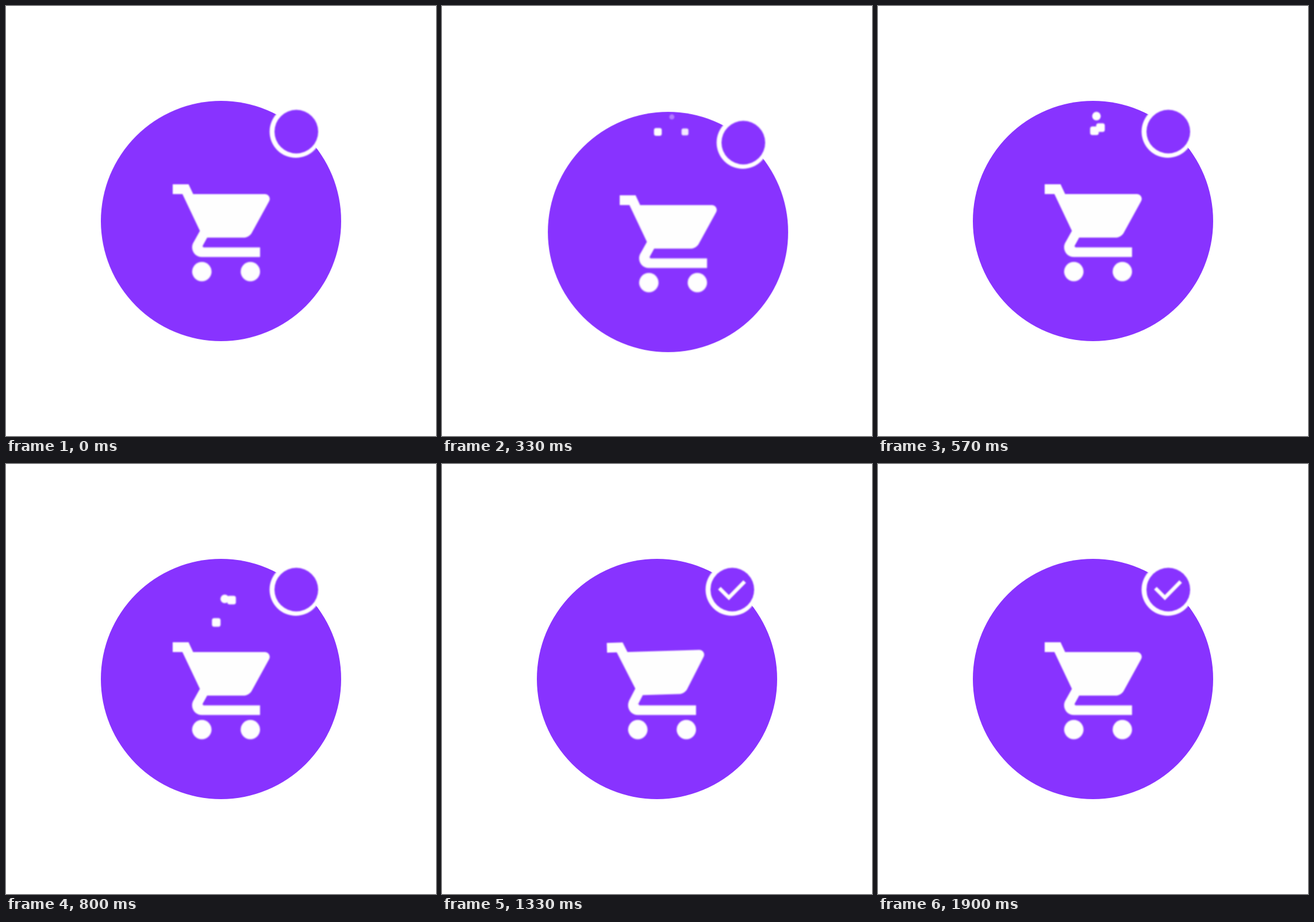
An HTML page without scripts for the animation above (2.03 s loop, 748 by 748 pixels).

```html
<!DOCTYPE html>
<html lang="en">
<head>
<meta charset="utf-8">
<title>Added to cart</title>
<style>
  html, body { margin: 0; width: 100%; height: 100%; overflow: hidden; background: #fff; }
  svg { display: block; width: 100vw; height: 100vh; }
  .disc { fill: #8833ff; }
  .white { fill: #fefefe; }
  .soft { filter: blur(1.3px); }
  .press, .basket, .item, .tick { animation: 2030ms linear infinite; }
  .press { animation-name: press; }
  .basket { animation-name: swing; transform-origin: 324px 421px; }
  .item { opacity: 0; }
  .a { animation-name: item-a; }
  .b { animation-name: item-b; }
  .c { animation-name: item-c; }
  .tick {
    animation-name: draw;
    fill: none; stroke: #fefefe; stroke-width: 6.5;
    stroke-dasharray: 1 2; stroke-dashoffset: 1.02;
  }

  @keyframes press {
    0% { transform: none; animation-timing-function: ease-in-out; }
    6.4% { transform: translate(39px, 39px); animation-timing-function: ease-in-out; }
    26%, 100% { transform: none; }
  }

  /* items gather above the cart, then drop in one by one */
  @keyframes item-a {
    0%, 3% { transform: translate(377px, 270px) scale(0); opacity: 0; }
    6.4% { transform: translate(377px, 251px) scale(.55); opacity: .35; animation-timing-function: ease-out; }
    16.2% { transform: translate(375.5px, 219px) scale(.9); opacity: 1; }
    28.1% { transform: translate(376.5px, 217px); opacity: 1; animation-timing-function: cubic-bezier(.5, 0, .9, .6); }
    43.8% { transform: translate(352px, 350px); opacity: 1; }
    43.9%, 100% { transform: translate(352px, 350px); opacity: 0; }
  }
  @keyframes item-b {
    0%, 4% { transform: translate(485px, 300px) scale(0); opacity: 0; }
    6.4% { transform: translate(471px, 284px) scale(.5); opacity: .12; animation-timing-function: ease-out; }
    16.2% { transform: translate(423px, 219px) scale(.8); opacity: .9; }
    28.1% { transform: translate(387px, 211.5px); opacity: 1; animation-timing-function: cubic-bezier(.5, 0, .9, .6); }
    51.7% { transform: translate(416px, 346px); opacity: 1; }
    51.8%, 100% { transform: translate(416px, 346px); opacity: 0; }
  }
  @keyframes item-c {
    0%, 12% { transform: translate(412px, 200px) scale(0); opacity: 0; }
    16.2% { transform: translate(400px, 193px) scale(.6); opacity: .35; }
    28.1% { transform: translate(380px, 191.5px); opacity: 1; animation-timing-function: cubic-bezier(.5, 0, .9, .6); }
    47.8% { transform: translate(382px, 350px); opacity: 1; }
    47.9%, 100% { transform: translate(382px, 350px); opacity: 0; }
  }

  @keyframes swing {
    0%, 42.8% { transform: none; animation-timing-function: ease-in; }
    46.8% { transform: rotate(2.5deg); animation-timing-function: ease-out; }
    50.7% { transform: rotate(4.9deg); animation-timing-function: ease-in-out; }
    58% { transform: rotate(-5.5deg); animation-timing-function: ease-in-out; }
    65.5% { transform: rotate(-1.8deg); animation-timing-function: ease-out; }
    70.8% { transform: rotate(1.2deg); animation-timing-function: ease-in-out; }
    76.5% { transform: rotate(-.6deg); animation-timing-function: ease-in-out; }
    83.5% { transform: rotate(.3deg); animation-timing-function: ease-in-out; }
    92%, 100% { transform: none; }
  }

  @keyframes draw {
    0%, 48.3% { stroke-dashoffset: 1.02; animation-timing-function: cubic-bezier(.3, .3, .4, 1); }
    63%, 100% { stroke-dashoffset: 0; }
  }
</style>
</head>
<body>
<svg viewBox="0 0 748 748">
  <g class="press">
    <circle class="disc" cx="374" cy="374" r="209"/>
    <g class="soft">
      <g class="white" transform="translate(281.5 293.2) scale(8.44)">
        <circle cx="7" cy="20" r="2"/>
        <circle cx="17" cy="20" r="2"/>
        <path d="M5.25 14.04c-.16.28-.25.61-.25.96 0 1.1.9 2 2 2h12v-2H7.42c-.14 0-.25-.11-.25-.25z"/>
      </g>
      <g class="basket">
        <path class="white" transform="translate(281.5 293.2) scale(8.44)"
          d="M1 2v2h2l3.6 7.59-1.35 2.45L5.2 15l1.97-.25.03-.12.9-1.63h7.45c.75 0 1.41-.41 1.75-1.03l3.58-6.49c.08-.14.12-.31.12-.48 0-.55-.45-1-1-1H5.21l-.94-2z"/>
      </g>
      <circle cx="504" cy="218.5" r="45.5" fill="#fff"/>
      <circle class="disc" cx="505" cy="218.5" r="38"/>
      <path class="tick" pathLength="1" d="M482.5 216L499 232.5 526.5 204.5"/>
    </g>
  </g>
  <g class="white soft">
    <rect class="item a" x="-7.5" y="-7.5" width="15" height="15" rx="4"/>
    <rect class="item b" x="-7.5" y="-7.5" width="15" height="15" rx="4"/>
    <circle class="item c" r="7.5"/>
  </g>
</svg>
</body>
</html>
```
